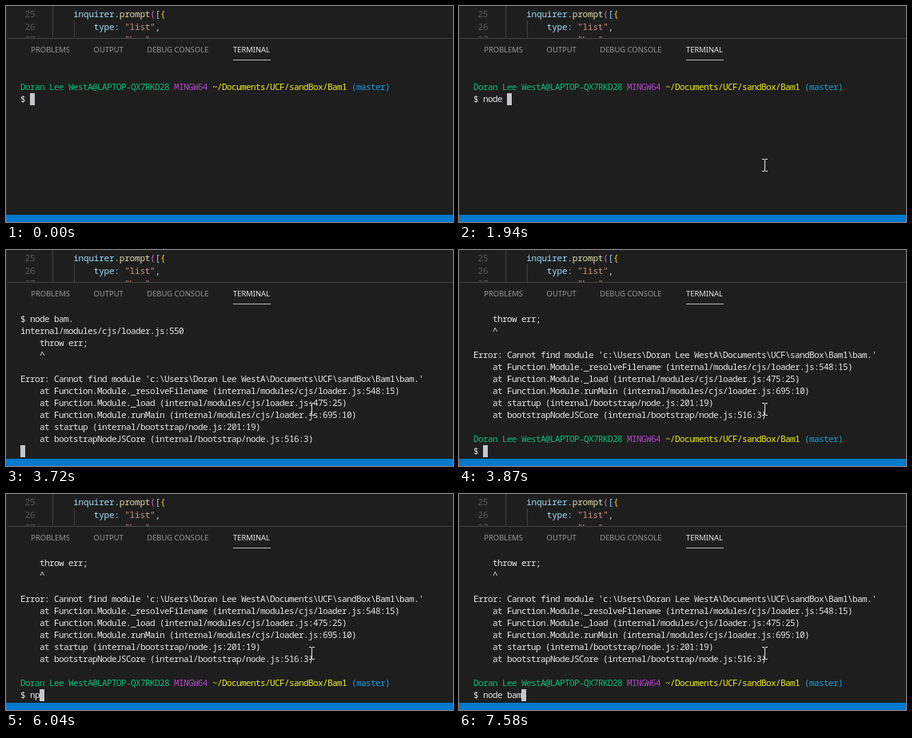
These frames come from a looping animation (559 by 270 pixels, 8000 ms). An HTML page with a canvas:

```html
<!DOCTYPE html>
<html lang="en">
<head>
<meta charset="utf-8">
<title>Terminal session</title>
<style>
  html, body { margin: 0; width: 100%; height: 100%; overflow: hidden; background: #1e1e1e; }
  canvas { display: block; width: 559px; height: 270px; }
</style>
</head>
<body>
<canvas id="stage" width="559" height="270"></canvas>
<script>
const W = 559, H = 270, LOOP = 8000;
const canvas = document.getElementById('stage');
const ctx = canvas.getContext('2d');
const ratio = window.devicePixelRatio || 1;
canvas.width = W * ratio;
canvas.height = H * ratio;
ctx.scale(ratio, ratio);

const MONO = '11px "Noto Sans Mono", "DejaVu Sans Mono", monospace';
const SANS = '9.4px "Noto Sans", "Open Sans", sans-serif';
const FG = '#e5e5e5';

// terminal grid
const LEFT = 18, TOP = 79, CELL = 6, ROW = 15, ROWS = 12;
const USER = 'Doran Lee WestA';
const HOST = 'LAPTOP-QX7RKD28';

const prompt = [
  [USER + '@' + HOST + ' ', '#0dbc79'],
  ['MINGW64 ', '#b048c8'],
  ['~/Documents/UCF/sandBox/Bam1 ', '#eded1c'],
  ['(master)', '#1a9fd8']
];
const plain = text => [[text, FG]];

const errorLines = [
  'internal/modules/cjs/loader.js:550',
  '    throw err;',
  '    ^',
  '',
  "Error: Cannot find module 'c:\\Users\\" + USER + "\\Documents\\UCF\\sandBox\\Bam1\\bam.'",
  '    at Function.Module._resolveFilename (internal/modules/cjs/loader.js:548:15)',
  '    at Function.Module._load (internal/modules/cjs/loader.js:475:25)',
  '    at Function.Module.runMain (internal/modules/cjs/loader.js:695:10)',
  '    at startup (internal/bootstrap/node.js:201:19)',
  '    at bootstrapNodeJSCore (internal/bootstrap/node.js:516:3)'
].map(plain);

// [time, input so far]
const firstInput = [
  [0, ''], [1550, 'n'], [1620, 'no'], [1700, 'nod'], [1770, 'node'],
  [1940, 'node '], [2490, 'node ba'], [2550, 'node bam.']
];
const secondInput = [
  [0, ''], [4960, 'n'], [5030, 'npo'], [5110, 'npod'], [5260, 'npode'],
  [5660, 'npod'], [5890, 'npo'], [5970, 'np'], [6120, 'n'],
  [6350, 'no'], [6580, 'nod'], [6660, 'node'], [6890, 'node '],
  [7350, 'node b'], [7430, 'node ba'], [7580, 'node bam']
];
const ENTER = 3410, FAIL = 3720, READY = 3870;

// [time, pointer centre]
const pointerSteps = [
  [0, null], [160, [426, 257]], [240, [396, 216]], [310, [382, 199]]
];

function valueAt(steps, t) {
  let value = steps[0][1];
  for (const [time, v] of steps) if (t >= time) value = v;
  return value;
}

function rect(x, y, w, h, color) {
  ctx.fillStyle = color;
  ctx.fillRect(x, y, w, h);
}

function drawSpans(spans, x, y, step) {
  ctx.font = MONO;
  for (const [text, color] of spans) {
    ctx.fillStyle = color;
    for (const ch of text) {
      if (ch !== ' ') ctx.fillText(ch, x, y);
      x += step;
    }
  }
}

function drawEditor() {
  const step = 6.4, x = 84.2;
  const key = '#9cdcfe', str = '#ce9178', punct = '#d4d4d4';
  const code = [
    [[['inquirer', key], ['.', punct], ['prompt', '#dcdcaa'], ['(', '#da70d6'],
      ['[', '#87cefa'], ['{', '#ffd700']], 0],
    [[['type:', key], [' "list"', str], [',', punct]], 4],
    [[['name:', key], [' "bam"', str], [',', punct]], 4]
  ];
  ctx.save();
  ctx.beginPath();
  ctx.rect(0, 0, W, 40);
  ctx.clip();
  rect(58, 0, 1, 40, '#404040');
  rect(85, 18, 1, 22, '#404040');
  code.forEach(([spans, indent], i) => {
    const y = 14 + i * 16;
    drawSpans([[String(25 + i), '#5a5a5a']], 23.6, y, step);
    drawSpans(spans, x + indent * step, y, step);
  });
  ctx.restore();
}

function drawPanel() {
  rect(2, 40, W - 2, 1, '#424242');
  ctx.font = SANS;
  const tabs = [['PROBLEMS', 31.3], ['OUTPUT', 109.6], ['DEBUG CONSOLE', 176.3], ['TERMINAL', 284]];
  for (const [label, x] of tabs) {
    ctx.fillStyle = label === 'TERMINAL' ? '#e7e7e7' : '#979797';
    ctx.fillText(label, x, 58);
  }
  rect(284, 67, 47, 1, '#b8b8b8');
  rect(0, 0, 2, 261, '#252526');
  rect(0, 261, W, 9, '#007acc');
}

function terminalState(t) {
  const typed = '$ ' + valueAt(firstInput, t);
  const lines = [plain(''), prompt, plain(typed)];
  let col = typed.length;
  if (t >= ENTER) {
    if (t >= FAIL) lines.push(...errorLines);
    lines.push(plain(''));
    col = 0;
  }
  if (t >= READY) {
    const next = '$ ' + valueAt(secondInput, t);
    lines.push(prompt, plain(next));
    col = next.length;
  }
  return { lines: lines.slice(-ROWS), col };
}

function drawTerminal(t) {
  const { lines, col } = terminalState(t);
  lines.forEach((spans, i) => drawSpans(spans, LEFT, TOP + i * ROW + 11, CELL));
  rect(LEFT + col * CELL, TOP + (lines.length - 1) * ROW, CELL, ROW, '#c4c8ca');
}

function drawPointer(t) {
  const pos = valueAt(pointerSteps, t);
  if (!pos) return;
  const [x, y] = pos, color = '#e4e4e4';
  rect(x, y - 7, 1, 14, color);
  for (const edge of [y - 8, y + 7]) {
    rect(x - 3, edge, 3, 1, color);
    rect(x + 1, edge, 3, 1, color);
  }
}

function frame(now) {
  const t = now % LOOP;
  rect(0, 0, W, H, '#1e1e1e');
  drawEditor();
  drawPanel();
  drawTerminal(t);
  drawPointer(t);
  requestAnimationFrame(frame);
}
requestAnimationFrame(frame);
</script>
</body>
</html>
```
